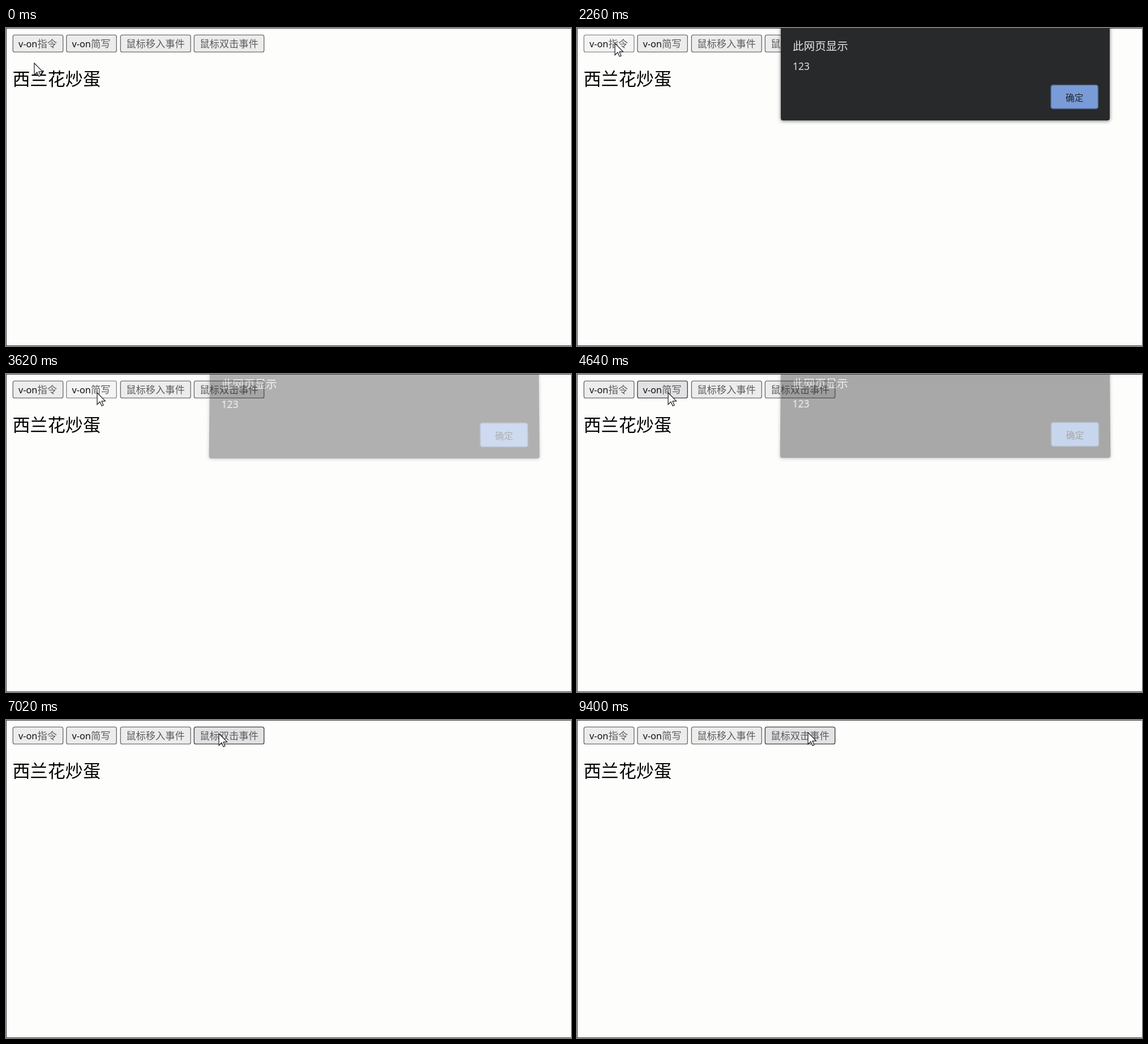
An HTML page with a canvas that plays this animation: 998 by 561 pixels, repeating every 9420 ms.

```html
<!DOCTYPE html>
<html lang="zh-CN">
<head>
<meta charset="utf-8">
<title>v-on</title>
<style>
html, body { margin: 0; width: 100%; height: 100%; overflow: hidden; background: #fdfdfc; }
canvas { display: block; width: 998px; height: 561px; }
</style>
</head>
<body>
<canvas id="stage" width="998" height="561"></canvas>
<script>
const W = 998, H = 561, LOOP = 9420;
const LATIN = '"Noto Sans", sans-serif';
const CJK = '"Noto Sans CJK SC", "Noto Sans CJK", sans-serif';
const ctx = document.getElementById('stage').getContext('2d');

const LOOKS = {
  normal: ['#ececec', '#707072'],
  hover: ['#e2e2e4', '#454548'],
  active: ['#f4f4f4', '#8c8c90']
};

// press: ticks during which the button shows the given look
const buttons = [
  { x: 12, w: 89, latin: 'v-on', text: '指令', press: [28, 53, 'active'] },
  { x: 106.5, w: 89, latin: 'v-on', text: '简写', press: [74, 96, 'active'] },
  { x: 202, w: 124.5, latin: '', text: '鼠标移入事件', press: [107, 134, 'normal'] },
  { x: 332, w: 124, latin: '', text: '鼠标双击事件', press: [163, 178, 'active'] }
];

// Ticks at which the dialog starts to open and to close
const dialogs = [[29, 53], [75, 96], [107, 134], [164, 178]];
const FADE = 5;

// Cursor moves: start tick, end tick, x, y
const moves = [[4, 17, 67, 27], [59, 71, 161, 33], [102, 112, 266, 32], [141, 154, 408, 22]];

const clamp = v => Math.max(0, Math.min(1, v));
const smooth = v => v * v * (3 - 2 * v);

// Playback runs in groups of three ticks lasting 100, 20 and 20 ms
function tickAt(ms) {
  const t = ms - 20, group = Math.floor(t / 140), rest = t - group * 140;
  return group * 3 + (rest < 100 ? 0 : rest < 120 ? 1 : 2);
}

function cursorAt(n) {
  let x = 50, y = 62;
  for (const [from, to, tx, ty] of moves) {
    const k = smooth(clamp((n - from) / (to - from)));
    x += (tx - x) * k;
    y += (ty - y) * k;
  }
  return { x: Math.round(x), y: Math.round(y) };
}

function label(c, str, x, y, size, family, color, weight = 400) {
  c.font = `${weight} ${size}px ${family}`;
  c.fillStyle = color;
  c.fillText(str, x, y);
}

function box(c, x, y, w, h, r, fill, stroke, line = 1.4) {
  c.beginPath();
  c.roundRect(x, y, w, h, r);
  c.fillStyle = fill;
  c.fill();
  if (!stroke) return;
  c.strokeStyle = stroke;
  c.lineWidth = line;
  c.stroke();
}

function makeDialog() {
  const layer = document.createElement('canvas');
  layer.width = W;
  layer.height = 210;
  const c = layer.getContext('2d');
  c.translate(0, 30);
  c.shadowColor = 'rgba(0,0,0,0.55)';
  c.shadowBlur = 6;
  c.shadowOffsetY = 1;
  box(c, 360, -40, 581, 203, 4, '#28292b');
  c.shadowColor = 'transparent';
  label(c, '此网页显示', 381, 38.5, 19.6, CJK, '#e6e7e9');
  label(c, '123', 381, 74, 17.4, LATIN, '#e0e1e3');
  box(c, 837, 100.5, 83.5, 42, 4, '#799cd8', '#4e6186', 1.5);
  label(c, '确定', 863, 128.5, 15.7, CJK, '#212328');
  return layer;
}
const dialog = makeDialog();

function dialogLevel(n) {
  for (const [open, close] of dialogs) {
    if (n < open || n >= close + FADE) continue;
    if (n >= close) return { p: 1 - (n - close) / FADE, drop: 25 };
    const left = 1 - clamp((n - open) / FADE);
    return { p: 1 - left * left, drop: 22 };
  }
  return { p: 0, drop: 0 };
}

// The dialog tilts while fading, so its lower rows grow slightly wider
function drawDialog({ p, drop }) {
  if (p <= 0) return;
  ctx.globalAlpha = p;
  const dy = -Math.round(drop * (1 - p));
  if (p === 1) {
    ctx.drawImage(dialog, 0, -30);
  } else {
    const mid = 650.5;
    for (let row = 0; row < dialog.height; row++) {
      const s = 1 + 0.008 * (1 - p) * Math.max(0, row - 30) / 163;
      ctx.drawImage(dialog, 0, row, W, 1, mid - mid * s, row - 30 + dy, W * s, 1);
    }
  }
  ctx.globalAlpha = 1;
}

function drawButton(b, n, pos) {
  const over = pos.x >= b.x && pos.x <= b.x + b.w && pos.y >= 12 && pos.y <= 43;
  const [from, to, look] = b.press;
  const state = n >= from && n < to ? look : over ? 'hover' : 'normal';
  const [fill, stroke] = LOOKS[state];
  box(ctx, b.x + 0.3, 12.4, b.w - 0.6, 30, 3, fill, stroke);
  if (b.latin) label(ctx, b.latin, b.x + 10, 33.7, 16.3, LATIN, '#111');
  label(ctx, b.text, b.x + (b.latin ? 43.5 : 10.3), 34.3, 17.25, CJK, '#5c5c5e', 300);
}

function drawCursor({ x, y }) {
  const points = [[0, 0], [0, 17], [4, 13.2], [6.6, 19], [9, 18], [6.5, 12.4], [11.8, 12]];
  ctx.beginPath();
  for (const [px, py] of points) ctx.lineTo(x + px * 1.22, y + py * 1.22);
  ctx.closePath();
  ctx.fillStyle = '#fff';
  ctx.fill();
  ctx.strokeStyle = '#1c1c20';
  ctx.lineWidth = 1.2;
  ctx.lineJoin = 'miter';
  ctx.stroke();
}

function draw(ms) {
  const n = tickAt(ms), pos = cursorAt(n);
  ctx.fillStyle = '#fdfdfc';
  ctx.fillRect(0, 0, W, H);
  ctx.fillStyle = '#3c3c40';
  ctx.fillRect(0, 0, W, 1);
  ctx.fillRect(0, 0, 1, H);
  ctx.fillRect(0, H - 1, W, 1);
  buttons.forEach(b => drawButton(b, n, pos));
  label(ctx, '西兰花炒蛋', 11.5, 101, 31.1, CJK, '#000', 500);
  drawDialog(dialogLevel(n));
  drawCursor(pos);
}

const start = performance.now();
function loop() {
  draw((performance.now() - start) % LOOP);
  requestAnimationFrame(loop);
}
loop();
</script>
</body>
</html>
```
